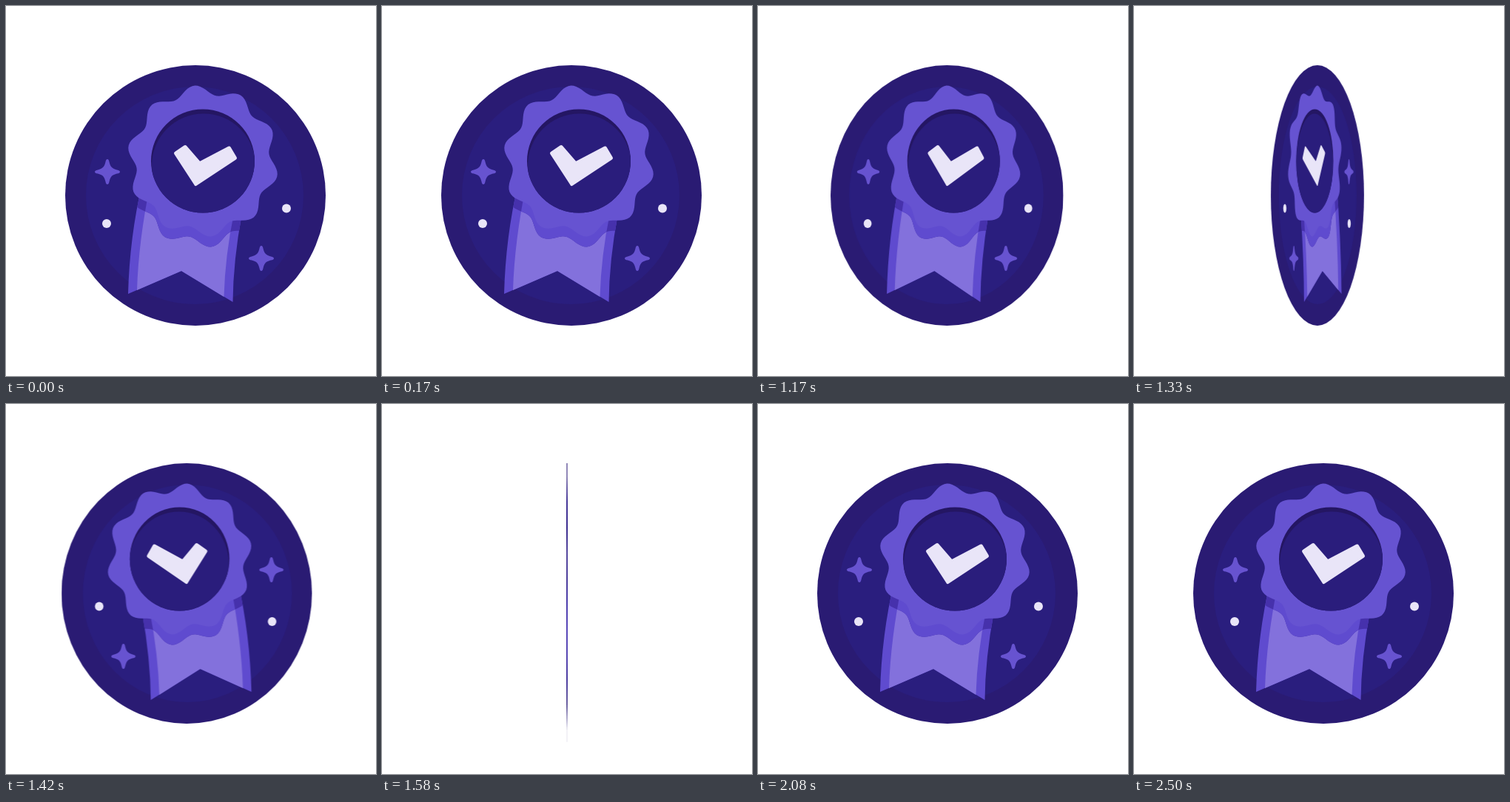
Write an HTML page that moves like this. It is 500 px wide and 500 px high and loops after 2.58 s.

```html
<!DOCTYPE html>
<html lang="en">
<head>
<meta charset="utf-8">
<title>Award badge</title>
<style>
  html, body { margin: 0; width: 100%; height: 100%; overflow: hidden; background: #fff; }
  svg { display: block; width: 100vw; height: 100vh; }
  #badge { transform-origin: 250px 250px; }
</style>
</head>
<body>
<svg viewBox="0 0 500 500">
  <defs>
    <path id="rosette"/>
    <path id="star" d="M0-17C1.5-17 2-15.5 2.6-13C4.2-6.5 6.5-4.2 13-2.6C15.500-2 17-1.500 17 0C17 1.500 15.500 2 13 2.600C6.500 4.200 4.200 6.500 2.600 13C2 15.500 1.500 17 0 17C-1.500 17-2 15.500-2.600 13C-4.200 6.500-6.500 4.200-13 2.600C-15.500 2-17 1.500-17 0C-17-1.500-15.500-2-13-2.600C-6.500-4.200-4.200-6.500-2.600-13C-2-15.500-1.500-17 0-17Z"/>
    <path id="ribbon" d="M184 240Q167 312 165 389L237 358L306.500 400Q307 344 319 280L300 240Z"/>
    <path id="band" d="M195 240Q179 318 177 384L237 358L294.500 393Q296 338 308 280L296 240Z"/>
    <clipPath id="inRibbon"><use href="#ribbon"/></clipPath>
    <clipPath id="inBand"><use href="#band"/></clipPath>
    <clipPath id="inDial"><circle cx="266" cy="209.500" r="70"/></clipPath>
  </defs>
  <g id="badge">
    <circle cx="256" cy="256" r="176" fill="#2a1b73"/>
    <circle cx="255" cy="256" r="147" fill="#2a1e7e"/>
    <g fill="#6753d0">
      <use href="#star" x="137" y="224"/>
      <use href="#star" x="345" y="341"/>
    </g>
    <g fill="#e9e5f8">
      <circle cx="136" cy="294" r="6"/>
      <circle cx="379" cy="273.500" r="6"/>
    </g>
    <use href="#ribbon" fill="#5f4bcf"/>
    <use href="#band" fill="#8371dc"/>
    <g clip-path="url(#inRibbon)"><use href="#rosette" y="14" fill="#4631ac"/></g>
    <g clip-path="url(#inBand)"><use href="#rosette" y="14" fill="#5f4bcf"/></g>
    <use href="#rosette" fill="#6653d1"/>
    <circle cx="266" cy="209.500" r="70" fill="#241663"/>
    <circle cx="267" cy="215.500" r="70" fill="#2a1d7c" clip-path="url(#inDial)"/>
    <path d="M229.500 199L242 190.500L261.500 213L301.500 192L309.500 205.500L256.500 240.500Z"
      fill="#e9e5f8" stroke="#e9e5f8" stroke-width="5" stroke-linejoin="round"/>
  </g>
</svg>
<script>
  const LOOP = 2580, FRAMES = 31, FRAME_MS = 1000 / 12;
  const SPIN_START = 1029.5, SPIN_MS = 823;

  // Ten soft lobes around the dial.
  function rosettePath() {
    const points = [];
    for (let deg = 0; deg < 360; deg += 2) {
      const a = deg * Math.PI / 180;
      const r = 96.2 + 6.3 * Math.cos(10 * (deg + 96.5) * Math.PI / 180);
      points.push((266 + r * Math.cos(a)).toFixed(2) + ' ' + (209.5 + r * Math.sin(a)).toFixed(2));
    }
    return 'M' + points.join('L') + 'Z';
  }

  // Width of the flat badge during one eased turn.
  function turnScale(ms) {
    const u = Math.min(1, Math.max(0, (ms - SPIN_START) / SPIN_MS));
    return Math.cos(2 * Math.PI * u * u * (3 - 2 * u));
  }

  document.getElementById('rosette').setAttribute('d', rosettePath());

  const steps = Array.from({ length: FRAMES + 1 }, (_, k) => ({
    offset: Math.min(1, Math.round(k * FRAME_MS / 10) * 10 / LOOP),
    transform: `scaleX(${turnScale(k * FRAME_MS).toFixed(5)})`,
    easing: 'step-end'
  }));
  document.getElementById('badge').animate(steps, { duration: LOOP, iterations: Infinity });
</script>
</body>
</html>
```
